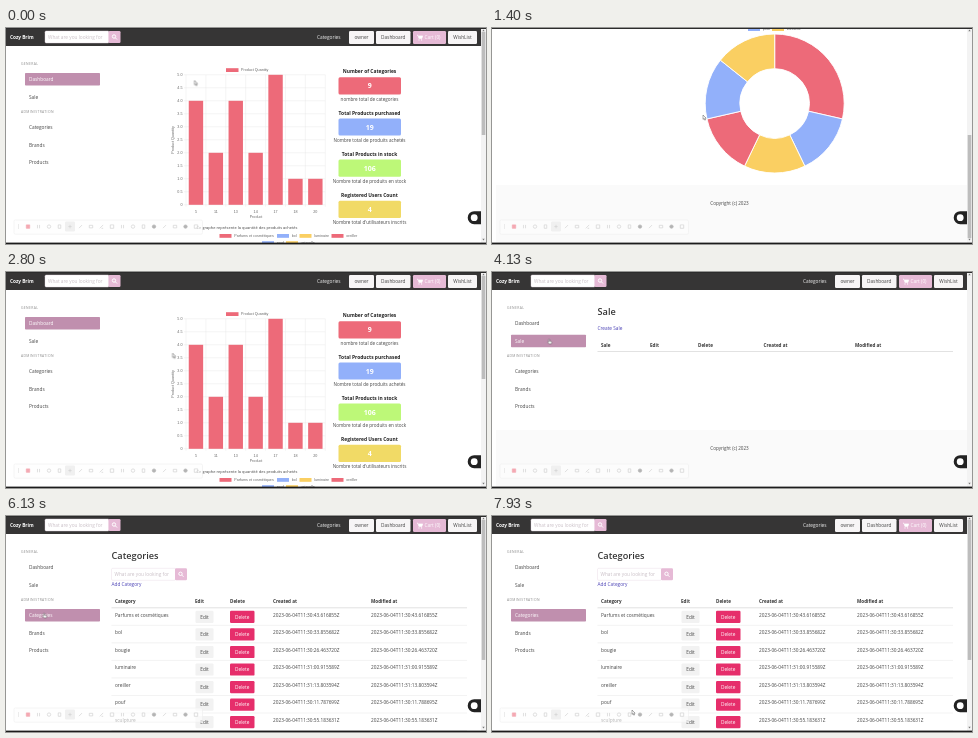
Write an HTML page that moves like this. It is 480x216 px and loops after 8000 ms.

```html
<!DOCTYPE html>
<html lang="en">
<head>
<meta charset="utf-8">
<title>Shop dashboard</title>
<style>
html, body { margin: 0; width: 100%; height: 100%; overflow: hidden; background: #fff; }
svg { display: block; width: 100vw; height: 100vh; }
text { font-family: "Open Sans", "Noto Sans", sans-serif; white-space: pre; }
.chart text { font-family: "Liberation Sans", Arial, sans-serif; }
.spin { animation: spin .8s linear infinite; transform-origin: 239.5px 27.5px; }
@keyframes spin { from { transform: rotate(30deg); } to { transform: rotate(390deg); } }
</style>
</head>
<body>
<svg id="stage" viewBox="0 0 480 216"></svg>
<script>
const LOOP = 8000, VIEW = 214, TRACK = 206;
const RED = '#ed6a79', BLUE = '#92b0fa', YELLOW = '#facf62', PINK = '#e6bad6', INK = '#444';
let css = '';

// Markup helpers; text y is the middle of the line.
const rect = (x, y, w, h, fill, r = 0, more = '') =>
  `<rect x="${x}" y="${y}" width="${w}" height="${h}" fill="${fill}" rx="${r}" ${more}/>`;
const text = (x, y, str, { size = 4.75, fill = INK, weight = 400, anchor = 'start', more = '' } = {}) =>
  `<text x="${x}" y="${y + size * .35}" font-size="${size}" fill="${fill}" font-weight="${weight}" text-anchor="${anchor}" ${more}>${str}</text>`;
const mid = (x, y, str, opt) => text(x, y, str, { anchor: 'middle', ...opt });
const line = (x1, y1, x2, y2, stroke, w = .5) =>
  `<path d="M${x1} ${y1}L${x2} ${y2}" stroke="${stroke}" stroke-width="${w}"/>`;

// Keyframe helpers; every list holds [ms, value...].
const pct = ms => (ms / LOOP * 100).toFixed(3) + '%';
function animate(name, keys, style, easing = 'linear') {
  css += `@keyframes ${name}{${keys.map(([ms, ...v]) => `${pct(ms)}{${style(...v)}}`).join('')}}
    .${name}{animation:${name} ${LOOP}ms ${easing} infinite}`;
}
function show(name, ...spans) {
  const keys = [[0, 'hidden']];
  for (const [from, to] of spans) {
    if (from === 0) keys.length = 0;
    keys.push([from, 'visible']);
    keys.push([to, to === LOOP ? 'visible' : 'hidden']);
  }
  if (keys[keys.length - 1][0] < LOOP) keys.push([LOOP, 'hidden']);
  animate(name, keys, v => `visibility:${v}`, 'step-end');
}
function scroll(name, keys, height) {
  animate(name, keys, y => `transform:translateY(${-y}px)`);
  animate(name + 'Thumb', keys, y => `transform:translateY(${y * TRACK / height}px)`);
}

function searchBox(x, y) {
  return rect(x, y, 64, 12, '#fff', 1.2, 'stroke="#e6d5e0" stroke-width=".4"')
    + text(x + 3, y + 6, 'What are you looking for', { fill: '#c9bfc6' })
    + rect(x + 63.5, y, 12, 12, PINK, 1.2)
    + `<g fill="none" stroke="#fff" stroke-width="1"><circle cx="${x + 69}" cy="${y + 5.5}" r="1.7"/><path d="M${x + 70.3} ${y + 6.8}l1.7 1.7"/></g>`;
}

function nav() {
  const button = (x, w, label) => rect(x, 3, w, 13, '#f7f5f6', 1.2) + mid(x + w / 2, 9.5, label);
  return rect(0, 0, 475, 18, '#363535')
    + text(4, 9.5, 'Cozy Brim', { fill: '#fff', weight: 700 })
    + searchBox(39, 3)
    + text(311, 9.5, 'Categories', { fill: '#f4f4f4' })
    + button(343, 25, 'owner') + button(370, 34.5, 'Dashboard') + button(442, 29, 'WishList')
    + rect(407, 3, 33, 13, PINK, 1.2)
    + '<path d="M411 7.2h1l.9 3.2h3l.8-2.5h-4" fill="#fff" stroke="#fff" stroke-width=".6"/><circle cx="413" cy="11.9" r=".6" fill="#fff"/><circle cx="415.6" cy="11.9" r=".6" fill="#fff"/>'
    + text(418.5, 9.5, 'Cart (0)', { fill: '#fff' });
}

function sidebar(active) {
  const items = { Dashboard: 51.3, Sale: 69, Categories: 99.3, Brands: 117, Products: 134.3 };
  const cap = { size: 3.4, fill: '#8a8a8a', more: 'letter-spacing=".35"' };
  return text(15, 36, 'GENERAL', cap) + text(15, 84, 'ADMINISTRATION', cap)
    + (active === 'Dashboard' ? `<g class="hover">${rect(19, 62.6, 75, 12.6, '#f4f4f4', .8)}</g>` : '')
    + Object.entries(items).map(([name, y]) => name === active
      ? rect(19, y - 6.3, 75, 12.6, '#c08fae', .8) + text(23, y, name, { fill: '#fff' })
      : text(23, y, name)).join('');
}

const footer = (y, h) => rect(4, y, 471, h, '#fafafa') + mid(237.5, y + 18.5, 'Copyright (c) 2023', { size: 4.6 });
const heading = (y, str) => text(105.5, y, str, { size: 9.2, weight: 600, fill: '#363636' });
const link = (y, str) => text(105.5, y, str, { fill: '#4a41b5' });
function tableHead(y, cols) {
  return cols.map(([x, name]) => text(x, y, name, { size: 4.6, weight: 700, fill: '#363636' })).join('')
    + line(105.5, y + 6.5, 461, y + 6.5, '#d6d6d6', .7);
}

function barChart() {
  const ids = [5, 11, 13, 14, 17, 18, 20], counts = [4, 2, 4, 2, 5, 1, 1];
  const left = 180, step = 19.9, base = 176.8, unit = 26;
  const small = { size: 3.7, fill: '#666' };
  let out = rect(220, 40.2, 12.5, 3.8, RED) + text(235, 42.2, 'Product Quantity', small);
  for (let i = 0; i <= 10; i++) {
    const y = base - i * unit / 2;
    out += line(left - 2, y, left + step * 7, y, '#e6e6e6', .4)
      + text(176.5, y, i ? (i / 2).toFixed(1) : '0', { ...small, anchor: 'end' });
  }
  for (let i = 0; i <= 7; i++) out += line(left + i * step, base - 5 * unit, left + i * step, base + 2, '#e6e6e6', .4);
  counts.forEach((n, i) => {
    const x = left + (i + .5) * step;
    out += rect(x - 7.2, base - n * unit, 14.4, n * unit, RED) + mid(x, 184, ids[i], small);
  });
  return out + mid(250, 189.2, 'Product', small)
    + mid(0, 0, 'Product Quantity', { ...small, more: 'transform="translate(167 112) rotate(-90)"' });
}

function donut(cx, cy, R, r) {
  const parts = [2, 1, 1, 1, 1, 1], fills = [RED, BLUE, YELLOW];
  const at = (rad, a) => `${cx + rad * Math.sin(a)} ${cy - rad * Math.cos(a)}`;
  let a = 0;
  return parts.map((n, i) => {
    const b = a + n / 7 * 2 * Math.PI;
    const d = `M${at(R, a)}A${R} ${R} 0 0 1 ${at(R, b)}L${at(r, b)}A${r} ${r} 0 0 0 ${at(r, a)}Z`;
    a = b;
    return `<path d="${d}" fill="${fills[i % 3]}" stroke="#fff" stroke-width=".9"/>`;
  }).join('');
}

function legend() {
  return [
    [213.5, 208, RED, 'Parfums et cosmétiques'], [271, 208, BLUE, 'bol'],
    [293.5, 208, YELLOW, 'luminaire'], [325.5, 208, RED, 'oreiller'],
    [256, 215.2, BLUE, 'pouf'], [280, 215.2, YELLOW, 'vaisselle']
  ].map(([x, y, fill, name]) => rect(x, y - 2, 12, 3.8, fill)
    + text(x + 14.7, y, name, { size: 3.7, fill: '#666' })).join('');
}

function cards() {
  return [
    ['Number of Categories', '9', RED, 'nombre total de categories'],
    ['Total Products purchased', '19', BLUE, 'Nombre total de produits achetés'],
    ['Total Products in stock', '106', '#bdf878', 'Nombre total de produits en stock'],
    ['Registered Users Count', '4', '#f1da66', "Nombre total d'utilisateurs inscrits"]
  ].map(([title, n, fill, note], i) => {
    const y = 43.6 + i * 41.2;
    return mid(363.5, y, title, { weight: 700, fill: '#222', size: 4.9 })
      + rect(332.5, y + 5.6, 62.5, 17.2, fill, 1.5)
      + mid(363.7, y + 14.3, n, { size: 7, weight: 700, fill: '#fff' })
      + mid(363.5, y + 27.6, note, { size: 4.6 });
  }).join('');
}

function dashboard() {
  return nav() + sidebar('Dashboard')
    + `<g class="chart">${barChart()}${legend()}${donut(282.7, 289.5, 69.5, 34.8)}</g>`
    + mid(241, 199.4, 'Ce graphe représente la quantité des produits achetés', { size: 4 })
    + cards() + footer(371, 60);
}

function sale() {
  return nav() + sidebar('Sale') + heading(39.5, 'Sale') + link(56, 'Create Sale')
    + tableHead(73, [[109, 'Sale'], [158, 'Edit'], [206, 'Delete'], [271.5, 'Created at'], [363, 'Modified at']])
    + footer(158, 57);
}

const listTop = () => sidebar('Categories') + heading(39.5, 'Categories') + searchBox(105.5, 52.3) + link(68.5, 'Add Category');

function loading() {
  return nav() + `<g transform="translate(0 8.7)">${listTop()}`
    + tableHead(85.3, [[109, 'Category'], [185, 'Edit'], [229, 'Delete'], [288.5, 'Created at'], [372, 'Modified at']])
    + footer(158, 49) + '</g>'
    + '<path class="spin" d="M239.5 21A6.5 6.5 0 0 1 246 27.5" fill="none" stroke="#777" stroke-width="1.3"/>';
}

function categories() {
  const rows = [
    ['Parfums et cosmétiques', '30:43.616855'], ['bol', '30:33.855682'], ['bougie', '30:26.463720'],
    ['luminaire', '31:00.915589'], ['oreiller', '31:13.803594'], ['pouf', '30:11.787699', '30:11.788695'],
    ['sculpture', '30:55.183631'], ['tapis', '30:18.962657'], ['vaisselle', '31:06.865607']
  ];
  const stamp = s => `2023-06-04T11:${s}Z`;
  return nav() + listTop()
    + tableHead(85.3, [[109, 'Category'], [189, 'Edit'], [224, 'Delete'], [267, 'Created at'], [365, 'Modified at']])
    + rows.map(([name, made, changed = made], i) => {
      const y = 99 + i * 17.54;
      return text(109, y, name) + text(267, y, stamp(made)) + text(365, y, stamp(changed))
        + rect(189.5, y - 4.2, 18, 12.2, '#f2f2f2', 1.2) + mid(198.5, y + 2, 'Edit')
        + rect(224, y - 4.2, 24.5, 12.2, '#e62e6b', 1.2) + mid(236.2, y + 2, 'Delete', { fill: '#fff' })
        + line(105.5, y + 10.3, 461, y + 10.3, '#e4e4e4', .5);
    }).join('') + footer(262, 54);
}

// Floating recorder bar and side tab.
function toolbar() {
  const shapes = ['M-2-2h4v4h-4z', 'M-1.2-2v4M1.2-2v4', 'M-2 0a2 2 0 1 0 4 0a2 2 0 1 0-4 0', 'M-1.5-2h3v4h-3z',
    'M0-2v4M-2 0h4', 'M-1.8 1.8L1.8-1.8', 'M-2-1.5h4v3h-4z', 'M-2 2L2-2M0 2h2'];
  const icons = Array.from({ length: 17 }, (_, i) => {
    const dark = i === 12 || i === 15;
    const color = i === 0 ? '#f4a9b3' : dark ? '#b4b4b4' : '#d2d2d2';
    return `<path transform="translate(${22 + i * 10.5} 198.6) scale(.85)" d="${dark ? shapes[2] : shapes[i % 8]}" fill="${i === 0 || dark ? color : 'none'}" stroke="${color}" stroke-width=".8"/>`;
  }).join('');
  return rect(8, 192, 188.5, 14.2, '#fdfdfd', 1.5, 'fill-opacity=".6" stroke="#efefef" stroke-width=".6"')
    + rect(59, 193.6, 10, 10, '#f0f0f0', 1) + line(12.5, 196, 12.5, 201, '#e6e6e6', .8) + icons
    + '<path d="M475 183.2h-6.8a6.5 6.5 0 0 0 0 13h6.8z" fill="#222"/><circle cx="468.2" cy="189.7" r="3.4" fill="#fff"/>';
}

const thumb = (cls, height) => `<g class="${cls}">${rect(475.7, 4, 3.6, TRACK * VIEW / height, '#bdbdbd')}</g>`;
const page = (cls, body) => `<g class="${cls}">${body}</g>`;

show('dash', [0, 3470]);
show('sale', [3470, 5380]);
show('load', [5380, 5950]);
show('cats', [5950, LOOP]);
show('hover', [3060, 3470]);
show('arrow', [0, 3060], [6270, LOOP]);
show('hand', [3060, 6270]);
scroll('dashScroll', [[0, 0], [250, 0], [930, 137], [1280, 214], [1530, 214], [1930, 129], [2450, 0], [LOOP, 0]], 428);
scroll('catsScroll', [[0, 0], [6700, 0], [6930, 41], [7170, 101], [7270, 101], [7560, 0], [LOOP, 0]], 315);
animate('cursor', [[0, 188.5, 52.5], [70, 188.5, 52.5], [500, 211, 87], [2640, 211, 87], [3200, 56.5, 67],
  [4470, 56.5, 67], [5200, 37.5, 97], [6180, 37.5, 97], [6530, 105.5, 154], [7600, 105.5, 154], [7900, 140, 194],
  [LOOP, 140, 194]], (x, y) => `transform:translate(${x}px,${y}px)`);

document.getElementById('stage').innerHTML = rect(0, 0, 480, 216, '#fff')
  + page('dash', page('dashScroll', dashboard()))
  + page('sale', sale())
  + page('load', loading())
  + page('cats', page('catsScroll', categories()))
  + rect(475, 0, 5, 215, '#f3f3f3')
  + page('dash', thumb('dashScrollThumb', 428))
  + page('load', thumb('still', 223))
  + page('cats', thumb('catsScrollThumb', 315))
  + '<path d="M476.3 3.2l1.2-1.7 1.2 1.7zM476.3 210.8l1.2 1.7 1.2-1.7z" fill="#777"/>'
  + toolbar()
  + rect(0, 0, 480, 1, '#2c2c2c')
  + rect(0, 214.6, 480, 1.4, '#1c1c1c')
  + `<g class="cursor" fill="#fff" stroke="#555" stroke-width=".5">
      <path class="arrow" d="M0 0v4.4l1-.9.8 1.7.8-.4-.8-1.6h1.3z"/>
      <path class="hand" d="M.2.4q.5-.6 1 0v1.7l1.6.4q.5.2.4.8l-.5 1.7h-2l-1.4-1.8q.2-.7.9-.1z"/>
    </g>`;
document.head.appendChild(document.createElement('style')).textContent = css;
</script>
</body>
</html>
```
